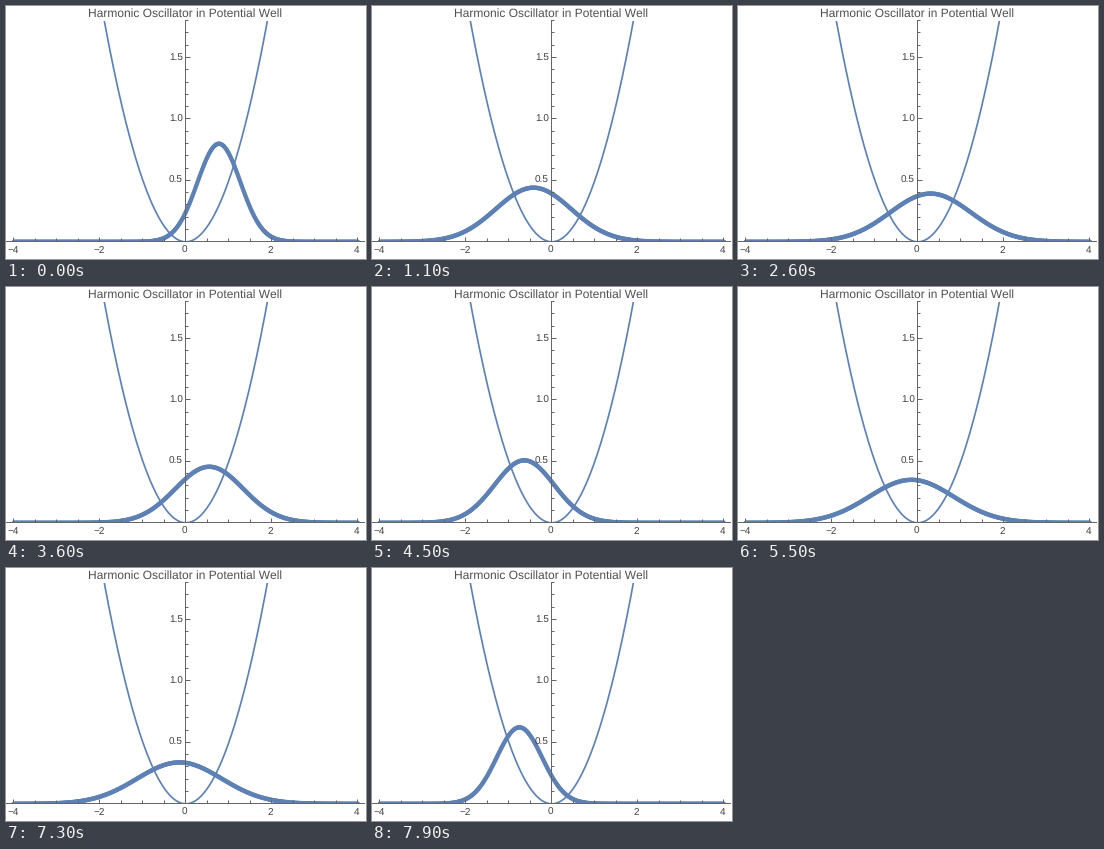
A matplotlib script that plays this animation: 360 by 253 pixels, repeating every 8000 ms.

```python
import numpy as np
import matplotlib.pyplot as plt
from matplotlib.animation import FuncAnimation
from matplotlib.collections import LineCollection
from matplotlib.ticker import MultipleLocator, NullFormatter

W, H, DPI = 360, 253, 64
PX = 72 / DPI                      # points per pixel
X0, Y0 = 179.85, 235.8             # pixel position of the origin
SX, SY = 43.0, 122.9               # pixels per unit
XMAX, YMAX = 4.16, 1.8
BLUE, GREY = "#5e81b5", "#666666"
FRAMES, PERIOD = 80, 32
SHIFT, SIGMA = 0.77, 0.5

plt.rcParams.update({"font.family": "Liberation Sans",
                     "text.hinting": "none", "text.hinting_factor": 1})
fig = plt.figure(figsize=(W / DPI, H / DPI), dpi=DPI, facecolor="white")


def add_panel(x0, y0):
    """Transparent axes whose data origin lies at pixel (x0, y0)."""
    panel = fig.add_axes([(x0 - XMAX * SX) / W, 1 - y0 / H,
                          2 * XMAX * SX / W, YMAX * SY / H])
    panel.set(xlim=(-XMAX, XMAX), ylim=(0, YMAX))
    panel.patch.set_visible(False)
    return panel


def draw_axes(ax):
    for side in ("top", "right"):
        ax.spines[side].set_visible(False)
    for side in ("left", "bottom"):
        ax.spines[side].set(color=GREY, linewidth=PX)
    ax.spines["left"].set_position(("data", 0))
    for axis, major, minor in ((ax.xaxis, 2, 0.5), (ax.yaxis, 0.5, 0.1)):
        axis.set_major_locator(MultipleLocator(major))
        axis.set_minor_locator(MultipleLocator(minor))
        axis.set_major_formatter(NullFormatter())
    for which, size in (("major", 4.5), ("minor", 2.7)):
        ax.tick_params(which=which, direction="in", color=GREY,
                       length=size * PX, width=PX)


def label(x, y, text, size=10, ha="center", color="#404040"):
    """Text with its baseline at pixel (x, y), counted from the top left."""
    fig.text(x / W, 1 - y / H, text, size=size * PX, ha=ha,
             va="baseline", color=color)


plot = add_panel(X0, Y0)
plot.axis("off")
# Half a pixel up and left, so that rounding keeps lines in the origin's pixel.
draw_axes(add_panel(X0 - 0.5, Y0 - 0.5))

label(179.5, 10.4, "Harmonic Oscillator in Potential Well", 12,
      color="#505050")
for v in range(-4, 5, 2):
    label(X0 - 1.1 + v * SX, 247.3, str(v).replace("-", "\u2212"))
for v in (0.5, 1.0, 1.5):
    label(176.8, Y0 - v * SY + 2.9, f"{v:.1f}", ha="right")

well = np.linspace(-2, 2, 201)
plot.plot(well, well**2 / 2, color=BLUE, lw=1.7 * PX, zorder=2)

xs = np.linspace(-4, 4, 401)
dots = LineCollection([], colors=BLUE, linewidths=4.6 * PX,
                      capstyle="round", zorder=3)
dots.set_snap(False)
plot.add_collection(dots, autolim=False)


def density(k):
    """Squeezed packet swinging in the well, with a slow loss of norm."""
    phase = 2 * np.pi * k / PERIOD
    var = (SIGMA * np.cos(phase))**2 + (np.sin(phase) / (2 * SIGMA))**2
    norm = np.exp(-0.0031 * k + 8e-6 * k**2)
    bell = np.exp(-(xs - SHIFT * np.cos(phase))**2 / (2 * var))
    return norm * bell / np.sqrt(2 * np.pi * var)


def update(k):
    ys = density(k)
    start = np.column_stack([xs, ys])
    end = np.column_stack([xs + 1e-3, ys])
    dots.set_segments(np.stack([start, end], axis=1))
    return (dots,)


anim = FuncAnimation(fig, update, frames=FRAMES, interval=100,
                     repeat=True, repeat_delay=0, blit=False)
plt.show()
```
